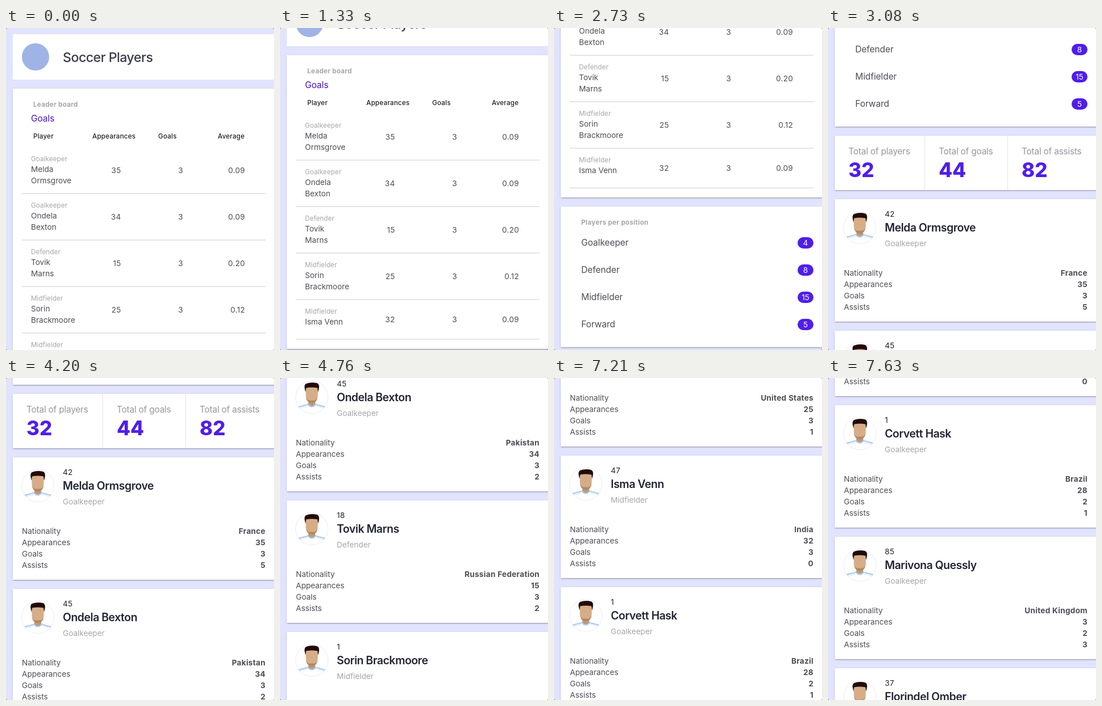
An HTML page that plays this animation: 472x568 px, repeating every 8 s.

```html
<!DOCTYPE html>
<html lang="en">
<head>
<meta charset="utf-8">
<title>Squad overview</title>
<style>
  html, body { margin: 0; width: 100%; height: 100%; overflow: hidden; background: #70707c; }
  #stage { position: absolute; width: 472px; height: 568px; overflow: hidden; border-radius: 3px; background: #e2e3fe; }
  #page { position: absolute; left: 0; top: 0; width: 472px; height: 2900px; will-change: transform;
    font-family: Inter, "Liberation Sans", sans-serif; color: #4c4c56; }
  #page > * { position: absolute; }
  .card { left: 12px; width: 480px; background: #fff;
    box-shadow: 0 2px 1px -1px rgba(0, 0, 0, .16), 0 1px 1px rgba(0, 0, 0, .1), 0 1px 4px rgba(0, 0, 0, .12); }
  .flat { box-shadow: none; }
  .line { background: #e5e5e9; }
  .t { line-height: 20px; white-space: nowrap; }
  .xs { font-size: 11.65px; letter-spacing: .1px; }
  .sm { font-size: 13.6px; }
  .md { font-size: 15.5px; letter-spacing: -.08px; }
  .num { letter-spacing: .25px; }
  .stat { font-size: 15.5px; letter-spacing: -.25px; color: #97979d; }
  .total { font-size: 35px; font-weight: 800; color: #4f1eea; }
  .title { font-size: 23.3px; font-weight: 500; letter-spacing: -.6px; color: #3b3b4b; }
  .name { font-size: 19.4px; font-weight: 600; letter-spacing: -.45px; color: #212433; }
  .mute { color: #a6a6aa; }
  .dark { color: #23232b; }
  .bold { font-weight: 700; letter-spacing: .28px; }
  .semi { font-weight: 500; letter-spacing: .2px; }
  .link { color: #4a0fc6; }
  .badge { left: 429px; width: 28px; height: 20px; border-radius: 10px; background: #4f1eea; color: #fff;
    font-size: 13.6px; line-height: 20px; text-align: center; }
  .mark { left: 28px; top: 27px; width: 48px; height: 48px; border-radius: 50%; background: #9fb4e4; }
  .face { left: 27px; width: 58px; height: 58px; }
</style>
</head>
<body>
<div id="stage"><div id="page"></div></div>
<svg width="0" height="0" style="position:absolute">
  <symbol id="face" viewBox="0 0 58 58">
    <circle cx="29" cy="29" r="28.5" fill="#fff" stroke="#ececf1"/>
    <path d="M6 46 21 42M52 46 37 42" stroke="#b3cff0" stroke-width="2.400"/>
    <path d="M7 48.500 21 45M51 48.500 37 45" stroke="#dce8f7"/>
    <path d="M23 34h12v8q-6 6-12 0z" fill="#c3986f"/>
    <path d="M21.500 40.500Q29 50.500 36.500 40.500" fill="none" stroke="#a9c9ee" stroke-width="2.200"/>
    <path d="M18.500 10h21v17q-.5 8-6.500 12h-8q-6-4-6.500-12z" fill="#d6ad87"/>
    <path d="M19 29.500Q22 35 25.500 34.500h7Q36 35 39 29.500 38 35.500 33 39h-8q-5-3.500-6-9.500z" fill="#b08a66"/>
    <path d="M18 20Q14 7 19 5 28 1.500 38 4 44.500 6 40 20L39 12.500Q29 10.500 19 12.500z" fill="#210b09"/>
  </symbol>
</svg>
<script>
const LOOP = 8000, TICK = 70;

// number, first name, last name, position, nationality, appearances, goals, assists
const players = [
  [42, 'Melda', 'Ormsgrove', 'Goalkeeper', 'France', 35, 3, 5],
  [45, 'Ondela', 'Bexton', 'Goalkeeper', 'Pakistan', 34, 3, 2],
  [18, 'Tovik', 'Marns', 'Defender', 'Russian Federation', 15, 3, 2],
  [1, 'Sorin', 'Brackmoore', 'Midfielder', 'United States', 25, 3, 1],
  [47, 'Isma', 'Venn', 'Midfielder', 'India', 32, 3, 0],
  [1, 'Corvett', 'Hask', 'Goalkeeper', 'Brazil', 28, 2, 1],
  [85, 'Marivona', 'Quessly', 'Goalkeeper', 'United Kingdom', 3, 2, 3],
  [37, 'Florindel', 'Omber', 'Goalkeeper', 'Chile', 12, 2, 1]
];

const parts = [];
const box = (cls, style, body = '') => parts.push(`<div class="${cls}" style="${style}">${body}</div>`);
const card = (y, h, cls = '') => box('card ' + cls, `top:${y}px;height:${h}px`);
const line = (x, y, w, h) => box('line', `left:${x}px;top:${y}px;width:${w}px;height:${h}px`);
// y is the middle of the capitals
const text = (x, y, s, cls) => box('t ' + cls, `left:${x}px;top:${y - 10}px`, s);
const textEnd = (x, y, s, cls) => box('t ' + cls, `right:${472 - x}px;top:${y - 10}px`, s);

function header() {
  card(11, 80, 'flat');
  box('mark', '');
  text(100, 52, 'Soccer Players', 'title');
}

function leaderBoard() {
  card(107, 518);
  text(48, 135, 'Leader board', 'xs bold mute');
  text(44, 160, 'Goals', 'md link');
  [[48, 'Player'], [152, 'Appearances'], [268, 'Goals'], [373, 'Average']]
    .forEach(([x, s]) => text(x, 191, s, 'xs semi dark'));
  players.slice(0, 5).forEach(([, first, last, role, , apps, goals], i) => {
    const y = 231 + 82 * i, single = i === 4, mid = y + (single ? 14 : 20);
    text(44, y, role, 'xs mute');
    if (single) text(44, y + 18, `${first} ${last}`, 'sm');
    else {
      text(44, y + 18, first, 'sm');
      text(44, y + 38, last, 'sm');
    }
    textEnd(202.5, mid, apps, 'sm num');
    textEnd(312, mid, goals, 'sm num');
    textEnd(421, mid, (goals / apps).toFixed(2), 'sm num');
    line(28, y + (single ? 48 : 60), 429, 2);
  });
}

function positions() {
  card(641, 248);
  text(48, 669, 'Players per position', 'xs bold mute');
  [['Goalkeeper', 4], ['Defender', 8], ['Midfielder', 15], ['Forward', 5]].forEach(([s, n], i) => {
    const y = 705 + 48 * i;
    text(48, y, s, 'md');
    box('badge', `top:${y - 10}px`, n);
  });
}

function totals() {
  card(905, 96);
  [[36, 'players', 32], [195, 'goals', 44], [341, 'assists', 82]].forEach(([x, s, n]) => {
    text(x, 933, 'Total of ' + s, 'stat');
    text(x, 965, n, 'total');
  });
  line(170, 905, 1, 96);
  line(316, 905, 1, 96);
}

function profile([num, first, last, role, nation, apps, goals, assists], i) {
  const y = 1017 + 232 * i;
  card(y, 216);
  parts.push(`<svg class="face" style="top:${y + 21}px"><use href="#face"/></svg>`);
  text(100, y + 26, num, 'sm num dark');
  text(100, y + 50, `${first} ${last}`, 'name');
  text(100, y + 78, role, 'sm mute');
  [['Nationality', nation], ['Appearances', apps], ['Goals', goals], ['Assists', assists]].forEach(([k, v], r) => {
    text(28, y + 130 + 20 * r, k, 'sm');
    textEnd(457, y + 130 + 20 * r, v, 'sm bold');
  });
}

header();
leaderBoard();
positions();
totals();
players.forEach(profile);
const page = document.getElementById('page');
page.innerHTML = parts.join('');

// [time, scroll offset]: swipes that slow down, with rests between
const path = [
  [0, 0], [210, -1], [1050, -1], [1820, 248], [2100, 300],
  [2660, 300], [3080, 715], [3360, 809],
  [3990, 809], [4200, 877], [4480, 1170], [4760, 1265],
  [5250, 1265], [5600, 1600], [5880, 1737], [6020, 1755],
  [6160, 1755], [6300, 1760], [7140, 1760], [7350, 1985], [7630, 2129], [LOOP, 2129]
];
const slope = i => (path[i + 1][1] - path[i][1]) / (path[i + 1][0] - path[i][0]);
const tangents = path.map((_, i) => {
  if (!i || i === path.length - 1) return 0;
  const a = slope(i - 1), b = slope(i);
  return a * b > 0 ? 2 * a * b / (a + b) : 0;
});

// monotone cubic through the path
function scrollAt(t) {
  let i = 0;
  while (i < path.length - 2 && t >= path[i + 1][0]) i++;
  const [t0, y0] = path[i], [t1, y1] = path[i + 1];
  const d = t1 - t0, u = (t - t0) / d, v = 1 - u;
  return y0 * v * v * (1 + 2 * u) + y1 * u * u * (3 - 2 * u)
    + d * u * v * (tangents[i] * v - tangents[i + 1] * u);
}

const frames = [];
for (let t = 0; t < LOOP; t += TICK) {
  frames.push({
    offset: Math.max(0, t - 1) / LOOP,
    transform: `translateY(${-Math.round(scrollAt(t))}px)`,
    easing: 'steps(1, end)'
  });
}
frames.push({ ...frames[frames.length - 1], offset: 1 });
page.animate(frames, { duration: LOOP, iterations: Infinity });
</script>
</body>
</html>
```
